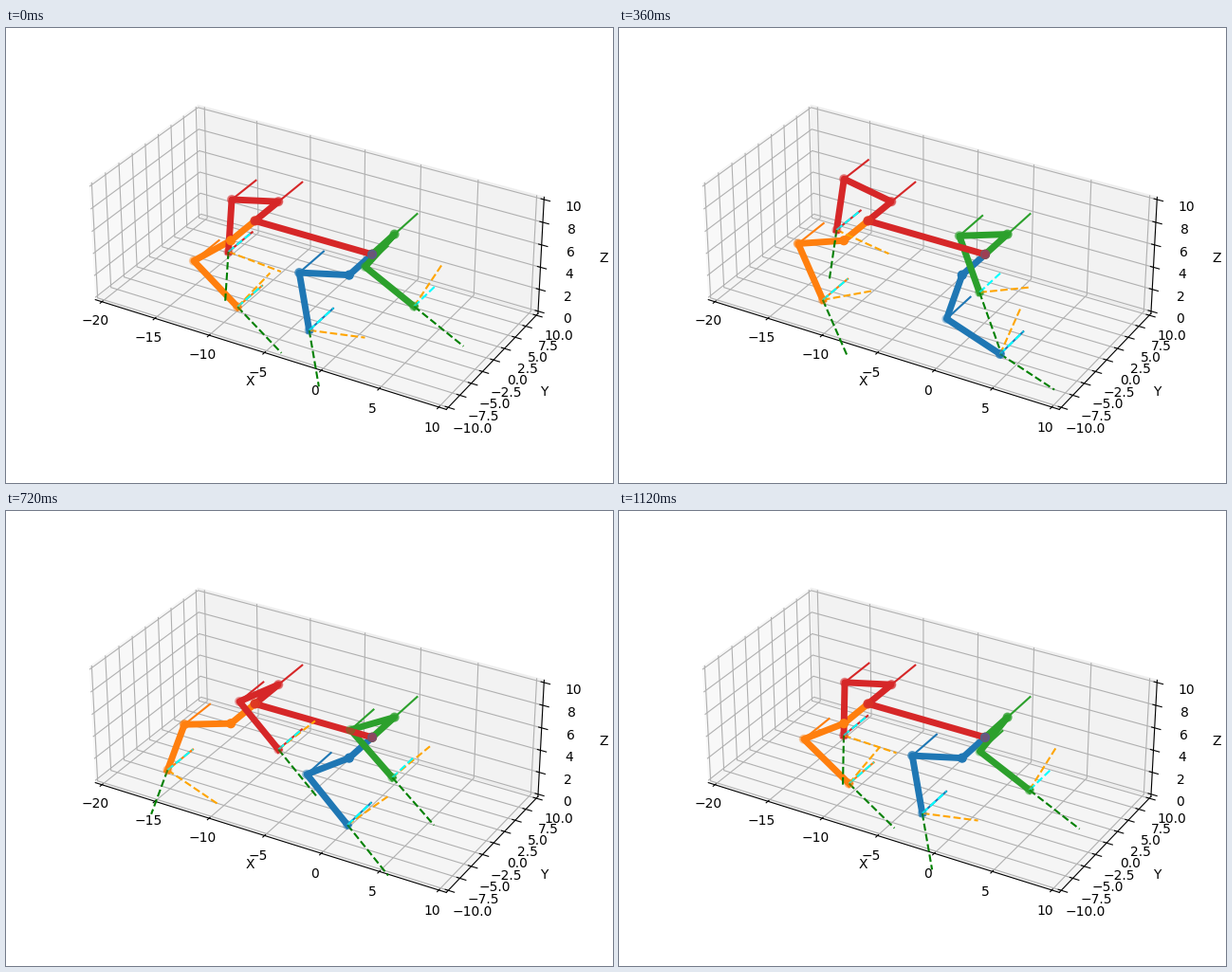
A matplotlib script that plays this animation: 640x480 px, repeating every 1140 ms.

```python
import numpy as np
import matplotlib.pyplot as plt
from matplotlib.animation import FuncAnimation

FRAMES = 57
SWING = FRAMES / 4
THIGH, SHIN = 4.5, 5.0
STRIDE = 3.5
AXIS = 5.0
HEIGHT, HALF_WIDTH = 6.0, 4.8
FRONT = (0.0, 0.0, HEIGHT)
REAR = (-10.5, 0.0, HEIGHT)

# colour, spine points, side, foot centre in x, lift, first swing frame, foot pivot shown
LEGS = [
    ("C0", [FRONT], -1, 0.0, 0.5, 0, True),
    ("C1", [REAR], -1, -13.5, 2.5, 43, True),
    ("C2", [FRONT], 1, 0.0, 0.5, 29, False),
    ("C3", [FRONT, REAR], 1, -13.5, 2.5, 14, True),
]

fig = plt.figure(figsize=(6.4, 4.8), dpi=100)
ax = fig.add_axes([0, 0, 1, 1], projection="3d")
ax.set_box_aspect((6, 3, 2))
ax.view_init(elev=30, azim=-60)


def padded(low, high):
    pad = (high - low) / 48
    return low - pad, high + pad


ax.set_xticks(np.arange(-20, 11, 5))
ax.set_yticks(np.arange(-10, 10.1, 2.5))
ax.set_zticks(np.arange(0, 11, 2))
ax.set_xlim(*padded(-20, 10))
ax.set_ylim(*padded(-10, 10))
ax.set_zlim(*padded(0, 10))
ax.set_xlabel("X")
ax.set_ylabel("Y")
ax.set_zlabel("Z")


def foot_path(step, lift):
    """Foot offset: half an ellipse in the air, then a slide along the ground."""
    if step < SWING:
        angle = np.pi * step / SWING
        return -STRIDE * np.cos(angle), lift * np.sin(angle)
    angle = np.pi * (step - SWING) / (FRAMES - SWING)
    return STRIDE * np.cos(angle), 0.0


def find_knee(hip, foot):
    dx, _, dz = foot - hip
    reach = np.hypot(dx, dz)
    bend = np.arccos((THIGH**2 + reach**2 - SHIN**2) / (2 * THIGH * reach))
    angle = np.arctan2(dx, -dz) - bend
    return hip + THIGH * np.array([np.sin(angle), 0, -np.cos(angle)])


def ray(start, direction, style, color):
    end = start + AXIS * np.asarray(direction)
    ax.plot(*np.array([start, end]).T, style, color=color)


def draw_leg(frame, color, spine, side, centre, lift, start, pivot):
    dx, z = foot_path((frame - start) % FRAMES, lift)
    y = side * HALF_WIDTH
    hip = np.array([spine[-1][0], y, HEIGHT])
    foot = np.array([centre + dx, y, z])
    knee = find_knee(hip, foot)
    chain = np.array([*spine, hip, knee, foot]).T
    ax.plot(*chain, color=color, linewidth=5)
    ax.scatter(*chain, color=color, s=40)

    for joint in (hip, knee, foot) if pivot else (hip, knee):
        ray(joint, (0, 1, 0), "-", color)
    down = (foot - knee) / SHIN
    ray(foot, (-down[2], 0, down[0]), "--", "orange")
    ray(foot, (0, 1, 0), "--", "cyan")
    ray(foot, down, "--", "green")


def draw(frame):
    for artist in [*ax.lines, *ax.collections]:
        artist.remove()
    for leg in LEGS:
        draw_leg(frame, *leg)
    return []


anim = FuncAnimation(fig, draw, frames=FRAMES, interval=20, init_func=lambda: [],
                     repeat=True)
plt.show()
```
